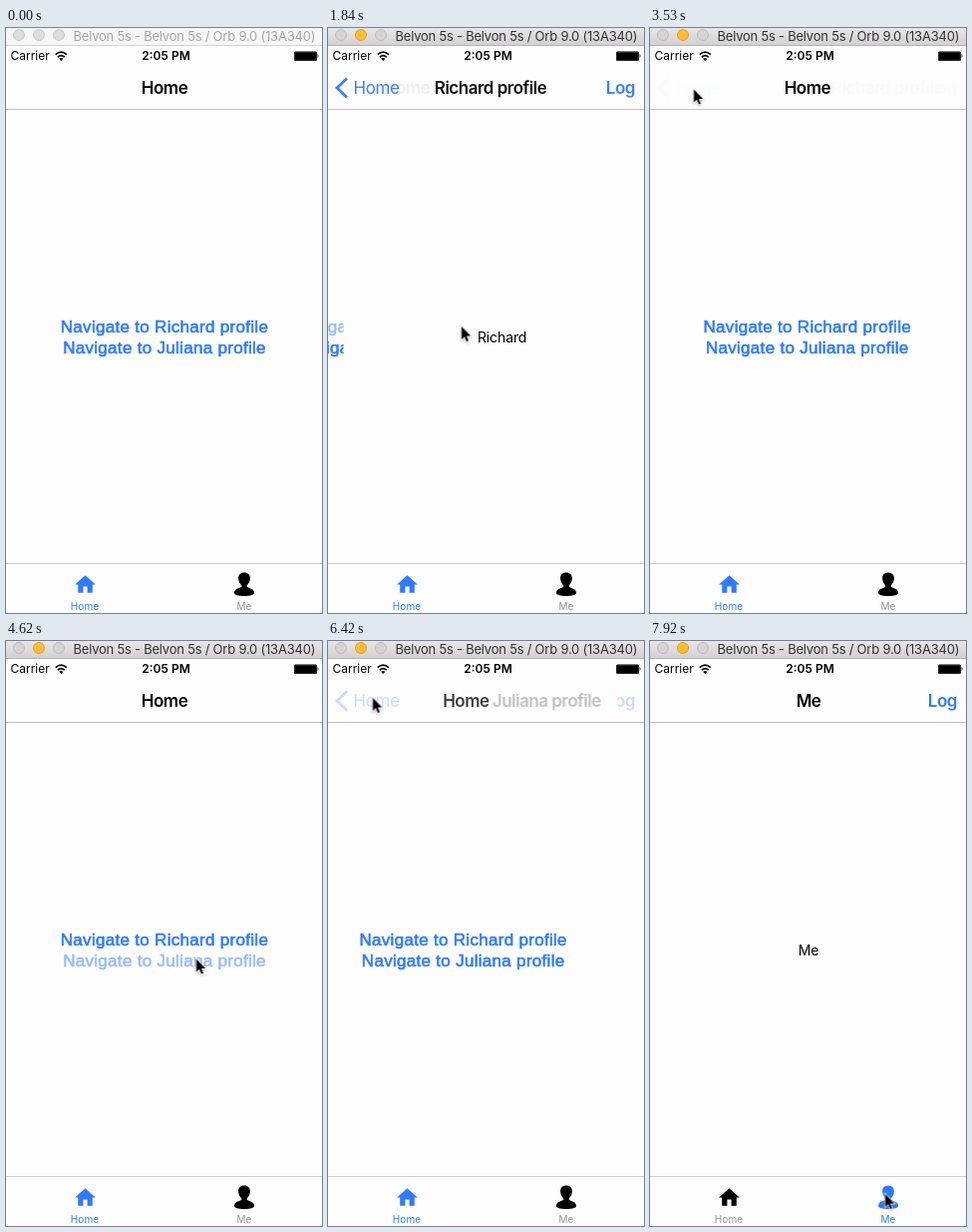
These frames come from a looping animation (317 by 586 pixels, 8 s). An HTML page:

```html
<!DOCTYPE html>
<html lang="en">
<head>
<meta charset="utf-8">
<title>Profile navigation</title>
<style>
/* --q: how far the profile is pushed, --me: second tab open, --on: window active */
@property --q { syntax: "<number>"; inherits: true; initial-value: 0; }
@property --me { syntax: "<number>"; inherits: true; initial-value: 0; }
@property --on { syntax: "<number>"; inherits: true; initial-value: 0; }

html, body { margin: 0; width: 100%; height: 100%; overflow: hidden; background: #fdfdfd; }
#stage {
  position: relative; width: 317px; height: 586px; overflow: hidden;
  background: #fdfdfd; color: #000; --blue: #2f7aff;
  font: 14px/20px Inter, Roboto, sans-serif;
  animation: push 8s linear infinite, tab 8s step-end infinite, focus 8s step-end infinite;
}
#stage div, #stage svg { position: absolute; }
.t { white-space: nowrap; }
.c { left: 0; width: 318px; text-align: center; }
.fill { inset: 0; }

/* window bar */
.bar { left: 0; top: 0; width: 317px; height: 17px; overflow: hidden; background: #f6f6f6; border-bottom: 1px solid #d3d3d3; }
.bar .t { left: 67.500px; top: -2.500px; font-size: 13px; letter-spacing: -.22px; color: #a6a6a6; }
.bar i { position: absolute; top: 1px; width: 10px; height: 10px; border: 1px solid #cbcbcb; border-radius: 50%; background: #dcdcdc; }
.bar i:nth-of-type(1) { left: 7px; }
.bar i:nth-of-type(2) { left: 27px; }
.bar i:nth-of-type(3) { left: 47px; }
.active { opacity: var(--on); background: linear-gradient(#e8e6e8, #d2d0d2); border-color: #b4b2b4; }
.active .t { color: #333; }
.active i { background: #d6d3d6; border-color: #bfbcbf; }
.active i:nth-of-type(2) { background: #fdbd2f; border-color: #e0a02a; }

/* status and navigation bars */
.status { top: 18px; font-size: 12px; }
.nav { left: 0; top: 38px; width: 317px; height: 43px; overflow: hidden; border-bottom: 1px solid #c4c4c4; font-size: 17px; }
.nav .t { top: 12px; letter-spacing: -.4px; }
.nav .c { font-weight: 600; letter-spacing: -.5px; }
.root { opacity: calc(1 - var(--q) - var(--me)); transform: translateX(calc(var(--q) * -84px)); }
.next { opacity: var(--q); transform: translateX(calc((1 - var(--q)) * 80px)); }
.back { color: var(--blue); opacity: var(--q); }
.nav .log {
  --k: max(var(--q), var(--me));
  left: 278.700px; color: var(--blue); font-weight: 600; opacity: var(--k);
  clip-path: inset(0 -4px 0 calc((1 - var(--k)) * 16px));
}
.me { opacity: var(--me); }

/* content */
.view { left: 0; top: 82px; width: 317px; height: 454px; overflow: hidden; }
.list { opacity: calc(1 - var(--me)); transform: translateX(calc(var(--q) * -95px)); }
.link {
  color: var(--blue); font: 17px/20px "Liberation Sans", Arial, sans-serif;
  letter-spacing: .3px; -webkit-text-stroke: .6px var(--blue);
}
.card { background: #fdfdfd; transform: translateX(calc((1 - var(--q)) * 317px)); }
.body { top: 218px; letter-spacing: -.1px; }
.first { animation: first 8s step-end infinite; }
.second { animation: second 8s step-end infinite; }

/* tabs */
.tabs { left: 0; top: 536px; width: 317px; height: 49px; border-top: 1px solid #cfcfcf; font-size: 10px; }
.tabs .t { top: 32px; width: 80px; text-align: center; letter-spacing: .15px; }
.off { color: #929292; opacity: var(--s); }
.on { color: var(--blue); opacity: calc(1 - var(--s)); }
.off svg { color: #000; }
.home { --s: var(--me); }
.self { --s: calc(1 - var(--me)); }
.home svg { left: 66.500px; top: 8px; }
.self svg { left: 227px; top: 7px; }
.home .t { left: 39px; }
.self .t { left: 199px; }

.cursor { left: 0; top: -.5px; overflow: visible; filter: drop-shadow(0 1px 1px #0004); animation: move 8s linear infinite; }

@keyframes push {
  0%, 45.5%, 84.625%, 100% { --q: 0; }
  19.375%, 58.375% { --q: 0; animation-timing-function: cubic-bezier(.25, .5, .2, 1); }
  25.125%, 64.25% { --q: 1; }
  38.875%, 78% { --q: 1; animation-timing-function: cubic-bezier(.25, .5, .2, 1); }
}
@keyframes tab { 0% { --me: 0; } 98.375%, 100% { --me: 1; } }
@keyframes focus { 0% { --on: 0; } 18.75%, 100% { --on: 1; } }
@keyframes first { 0% { opacity: 1; } 50%, 100% { opacity: 0; } }
@keyframes second { 0% { opacity: 0; } 50%, 100% { opacity: 1; } }
@keyframes tap1 { 0%, 25.2%, 100% { opacity: 1; } 18.75% { opacity: .5; } }
@keyframes tap2 { 0%, 64.3%, 100% { opacity: 1; } 57.4% { opacity: .5; } }
@keyframes move {
  0%, 6.25% { transform: translate(76px, 590px); }
  8.5% { transform: translate(79px, 512px); }
  10% { transform: translate(86px, 440px); }
  12% { transform: translate(101px, 345px); animation-timing-function: ease-out; }
  14.25%, 30.375% { transform: translate(133.5px, 298.5px); }
  33.25% { transform: translate(82px, 112px); }
  36.25% { transform: translate(58.5px, 69px); animation-timing-function: ease-out; }
  38.5% { transform: translate(43.5px, 61px); }
  47.75% { transform: translate(43.5px, 61px); animation-timing-function: ease-in; }
  51.25% { transform: translate(62px, 140px); }
  54.4% { transform: translate(150px, 288px); animation-timing-function: ease-out; }
  57%, 69.5% { transform: translate(190.5px, 318px); }
  72.375% { transform: translate(94.5px, 98.5px); }
  75.75% { transform: translate(50px, 61px); animation-timing-function: ease-out; }
  77.5%, 83.1% { transform: translate(44.5px, 56.5px); }
  84.4% { transform: translate(50px, 85px); }
  87.5% { transform: translate(130px, 282px); }
  89.6%, 90.2% { transform: translate(206px, 426px); animation-timing-function: ease-out; }
  95.4%, 100% { transform: translate(235.5px, 553.5px); }
}
</style>
</head>
<body>
<div id="stage">
  <div class="bar"><i></i><i></i><i></i><div class="t">Belvon 5s - Belvon 5s / Orb 9.0 (13A340)</div></div>
  <div class="bar active"><i></i><i></i><i></i><div class="t">Belvon 5s - Belvon 5s / Orb 9.0 (13A340)</div></div>

  <div class="status t" style="left:4.5px">Carrier</div>
  <div class="status t c" style="left:1.5px;font-weight:600">2:05 PM</div>
  <svg class="status" style="left:0" width="317" height="20">
    <path d="M49.7 8.6Q55.3 3.6 60.9 8.6M51.8 11.2Q55.3 8.2 58.8 11.2" fill="none" stroke="#000" stroke-width="1.7"/>
    <path d="M53.2 12.8Q55.3 11 57.4 12.8L55.3 15ZM312.6 8q1.8 2 0 4z"/>
    <rect x="289" y="5.5" width="23" height="9.5" rx="1.5"/>
    <rect x="289.700" y="6.200" width="21.600" height="8.100" rx="1" fill="none" stroke="#666" stroke-width=".5"/>
  </svg>

  <div class="nav">
    <div class="t c root">Home</div>
    <div class="t c next"><div class="t c first" style="top:0">Richard profile</div><div class="t c second" style="top:0">Juliana profile</div></div>
    <div class="t c me">Me</div>
    <svg class="back" style="left:0;top:0" width="26" height="43"><path d="M19 12.5 9 22l10 9.5" fill="none" stroke="currentColor" stroke-width="2.8"/></svg>
    <div class="t back" style="left:25.5px">Home</div>
    <div class="t log">Log</div>
  </div>

  <div class="view">
    <div class="fill list">
      <div class="t c link" style="top:208px;animation:tap1 8s step-end infinite">Navigate to Richard profile</div>
      <div class="t c link" style="top:228.5px;animation:tap2 8s step-end infinite">Navigate to Juliana profile</div>
    </div>
    <div class="fill card">
      <div class="t c body first">Richard</div>
      <div class="t c body second">Juliana</div>
    </div>
    <div class="t c body me">Me</div>
  </div>

  <svg width="0" height="0">
    <symbol id="house" viewBox="0 0 24 24"><path d="M10 20v-6h4v6h5v-8h3L12 3 2 12h3v8z"/></symbol>
    <symbol id="person" viewBox="0 0 24 26"><path d="M12 1.500C8 1.500 5.900 4 6.100 7.600c.2 2.900 1.500 5.300 3.100 6.600v1.600C7.500 17.300 2 17.500 2 21.800 2 24 6 25 12 25s10-1 10-3.200c0-4.300-5.500-4.500-7.200-6v-1.600c1.600-1.300 2.900-3.700 3.100-6.600C18.100 4 16 1.500 12 1.500z"/></symbol>
  </svg>
  <div class="tabs">
    <div class="home off"><svg width="25" height="25" fill="currentColor"><use href="#house"/></svg><div class="t">Home</div></div>
    <div class="home on"><svg width="25" height="25" fill="currentColor"><use href="#house"/></svg><div class="t">Home</div></div>
    <div class="self off"><svg width="24" height="26" fill="currentColor"><use href="#person"/></svg><div class="t">Me</div></div>
    <div class="self on"><svg width="24" height="26" fill="currentColor"><use href="#person"/></svg><div class="t">Me</div></div>
  </div>

  <svg class="cursor" width="12" height="19"><path d="M.5.5v13l3-2.800 2 4.800 2-.8-2-4.700h4.200z" stroke="#fff" stroke-width="1.500" paint-order="stroke"/></svg>
</div>
</body>
</html>
```
